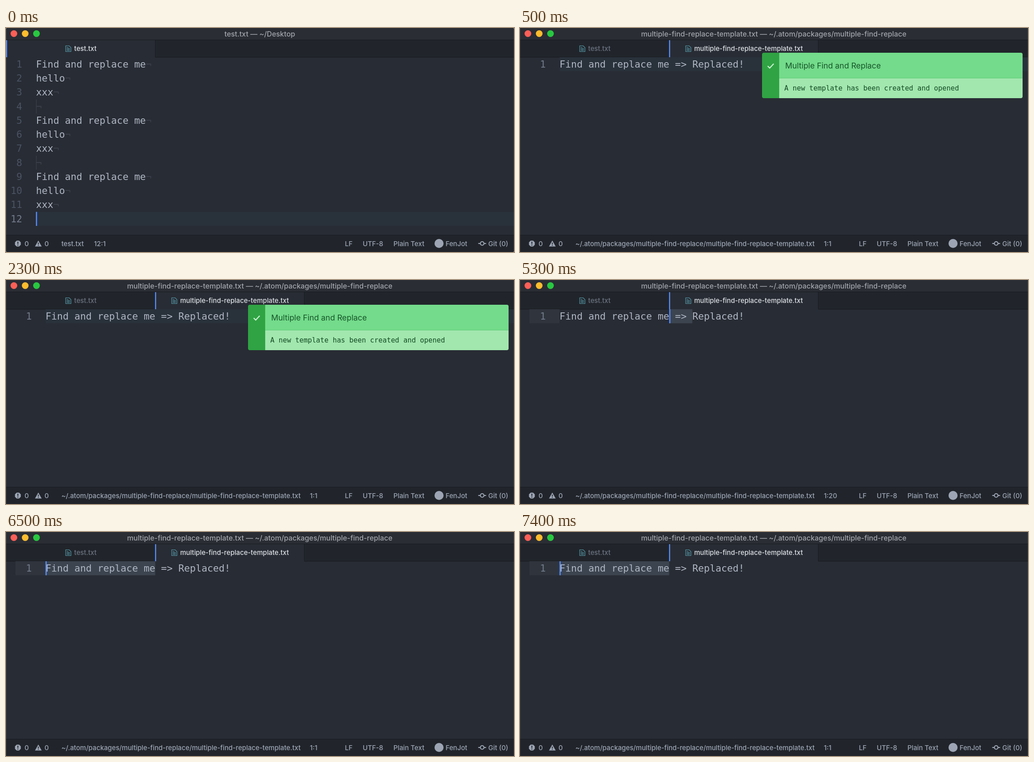
Recreate the animation shown at these times as an HTML page with a canvas. Size 1125 by 498 pixels, loop 8000 ms.

```html
<!DOCTYPE html>
<html lang="en">
<head>
<meta charset="utf-8">
<title>Editor</title>
<style>
html, body { margin: 0; width: 100%; height: 100%; overflow: hidden; background: #fff; }
canvas { display: block; width: 1125px; height: 498px; }
</style>
</head>
<body>
<canvas id="stage"></canvas>
<script>
const W = 1125, H = 498, LOOP = 8000;
const UI = 'Inter, "Open Sans", sans-serif';
const MONO = '"DejaVu Sans Mono", "Liberation Mono", monospace';
const C = {
  editor: '#282c34', bar: '#21252b', edge: '#181a1f', text: '#afb6c3',
  ui: '#9da5b4', dim: '#6b727f', bright: '#dde0e6', gutter: '#4b5364',
  gutterOn: '#737c8c', faint: '#3b414c', accent: '#568af2', cursor: '#528bff',
  row: '#29313b', gutterRow: '#30353d', select: '#3c4450'
};
const TOP = 65, ROW = 31.25, CHAR = 12.79, CODE = 21.25;
const FILE = 'multiple-find-replace-template.txt';
const DIR = '~/.atom/packages/multiple-find-replace';

const canvas = document.getElementById('stage');
const ctx = canvas.getContext('2d');
const dpr = window.devicePixelRatio || 1;
canvas.width = W * dpr;
canvas.height = H * dpr;
ctx.scale(dpr, dpr);
ctx.beginPath();
ctx.roundRect(0, 0, W, H, 3);
ctx.clip();

function rect(x, y, w, h, color) {
  ctx.fillStyle = color;
  ctx.fillRect(x, y, w, h);
}

function disc(x, y, r, color) {
  ctx.fillStyle = color;
  ctx.beginPath();
  ctx.arc(x, y, r, 0, Math.PI * 2);
  ctx.fill();
}

function path(points, close) {
  ctx.beginPath();
  points.forEach(([x, y]) => ctx.lineTo(x, y));
  if (close) ctx.closePath();
}

function stroke(points, color, width, close) {
  path(points, close);
  ctx.strokeStyle = color;
  ctx.lineWidth = width;
  ctx.stroke();
}

function fill(points, color) {
  path(points, true);
  ctx.fillStyle = color;
  ctx.fill();
}

function label(str, x, y, color, font, align = 'left') {
  ctx.font = font;
  ctx.textAlign = align;
  ctx.fillStyle = color;
  ctx.fillText(str, x, y);
}

const ui = (str, x, y, color, size = 14.75, weight = 500, align) =>
  label(str, x, y, color, `${weight} ${size}px ${UI}`, align);
const mono = (str, x, y, color, size = CODE, align) =>
  label(str, x, y, color, `${size}px ${MONO}`, align);

function titleBar(title) {
  rect(0, 0, W, 26, '#2a2d34');
  rect(0, 26, W, 1, C.edge);
  ['#fc5f57', '#fdbc2e', '#28c840'].forEach((c, i) => disc(17.5 + i * 25, 12.5, 7.4, c));
  ui(title, 562, 18.6, '#a2a5ab', 15.85, 500, 'center');
}

function fileIcon(x, y) {
  const color = '#559aaa';
  stroke([[x, y], [x + 7.5, y], [x + 11.5, y + 4], [x + 11.5, y + 13], [x, y + 13]], color, 1.2, true);
  for (const [dy, w] of [[3.5, 3.5], [6, 7], [8.3, 7], [10.5, 7]]) {
    rect(x + 2.2, y + dy - 0.5, w, 1.1, color);
  }
}

function tab(x, name, iconX, active) {
  if (active) {
    rect(x, 27, 330, 39, C.editor);
    rect(x, 27, 2.5, 38, C.accent);
  }
  rect(x + 330, 27, 1, 38, C.edge);
  fileIcon(iconX, 39.5);
  ui(name, iconX + 18.7, 51.4, active ? C.bright : C.dim);
}

function statusBar(file, pos, posX) {
  rect(0, 460, W, 38, C.bar);
  rect(0, 460, W, 1, C.edge);
  const y = 485;

  const octagon = Array.from({ length: 8 }, (_, i) => {
    const a = (i + 0.5) * Math.PI / 4;
    return [26.3 + 7 * Math.cos(a), 479.3 + 7 * Math.sin(a)];
  });
  fill(octagon, C.ui);
  rect(25.3, 475, 2, 5.2, C.bar);
  rect(25.3, 481.6, 2, 2, C.bar);
  ui('0', 41, y, C.ui);

  fill([[71.6, 472.4], [79, 485.8], [64.2, 485.8]], C.ui);
  rect(70.7, 477, 1.8, 4.2, C.bar);
  rect(70.7, 482.4, 1.8, 1.8, C.bar);
  ui('0', 85.3, y, C.ui);

  ui(file, 122.7, y, C.ui);
  ui(pos, posX, y, C.ui);
  ui('LF', 750.5, y, C.ui);
  ui('UTF-8', 790, y, C.ui);
  ui('Plain Text', 858, y, C.ui);
  disc(959, 479, 10, C.ui);
  ui('FenJot', 973.5, y, C.ui);

  ctx.beginPath();
  ctx.arc(1054.5, 479, 4, 0, Math.PI * 2);
  ctx.strokeStyle = C.ui;
  ctx.lineWidth = 2.2;
  ctx.stroke();
  rect(1045.8, 478, 4.5, 2.1, C.ui);
  rect(1058.7, 478, 4.5, 2.1, C.ui);
  ui('Git (0)', 1068, y, C.ui);
}

function frameBase(title) {
  rect(0, 0, W, H, C.editor);
  titleBar(title);
  rect(0, 27, W, 38, C.bar);
  rect(0, 64.5, W, 1, C.edge);
}

function windowEdge() {
  const glow = 'rgba(255, 255, 255, 0.08)';
  rect(0, 0, 1, H, glow);
  rect(W - 1, 0, 1, H, glow);
}

function testFile() {
  frameBase('test.txt — ~/Desktop');
  tab(0, 'test.txt', 132.3, true);
  const block = ['Find and replace me', 'hello', 'xxx', ''];
  const x = 66.5;
  for (let i = 0; i < 12; i++) {
    const top = TOP + i * ROW, base = top + 22.8, last = i === 11;
    if (last) rect(x, top, W - x, ROW, C.row);
    mono(String(i + 1), 35.8, base, last ? C.gutterOn : C.gutter, CODE, 'right');
    if (last) {
      rect(x - 0.3, top, 2.6, ROW, C.cursor);
      continue;
    }
    const line = block[i % 4];
    if (!line) rect(x, top, 1.2, ROW, C.faint);
    mono(line, x, base, C.text);
    mono('¬', x + line.length * CHAR, base, C.faint);
  }
  statusBar('test.txt', '12:1', 195);
}

function notice() {
  const x = 536, y = 55, w = 577, h = 101, side = 38;
  ctx.save();
  ctx.beginPath();
  ctx.roundRect(x, y, w, h, 4);
  ctx.clip();
  rect(x, y, side, h, '#30a344');
  rect(x + side, y, w - side, 57, '#73db8b');
  rect(x + side, y + 56, w - side, 1, '#62cc7b');
  rect(x + side, y + 57, w - side, h - 57, '#a2e7ae');
  ctx.restore();
  stroke([[548.5, 84.5], [553, 89], [561.8, 79.5]], '#c9f2d0', 2.4);
  ui('Multiple Find and Replace', 587.3, 90, '#175529', 17.4, 400);
  mono('A new template has been created and opened', 585.3, 139, '#124a23', 15.3);
}

// sel: [first, last) columns of the selection, cursor at its start
function templateFile(sel, pos) {
  const x = 87.5;
  frameBase(`${FILE} — ${DIR}`);
  tab(0, 'test.txt', 132.3, false);
  tab(330, FILE, 367, true);
  if (sel) {
    const start = x + sel[0] * CHAR;
    rect(21, TOP, x - 21, ROW, C.gutterRow);
    rect(start, TOP, (sel[1] - sel[0]) * CHAR, ROW, C.select);
  } else {
    rect(x, TOP, W - x, ROW, C.row);
  }
  mono('1', 57, TOP + 22.8, C.gutterOn, CODE, 'right');
  mono('Find and replace me => Replaced!', x, TOP + 22.8, C.text);
  if (sel) rect(x + sel[0] * CHAR, TOP, 2.6, ROW, C.cursor);
  statusBar(`${DIR}/${FILE}`, pos, 673);
}

function draw() {
  const t = performance.now() % LOOP;
  if (t < 500) {
    testFile();
  } else if (t < 3500) {
    templateFile(null, '1:1');
    notice();
  } else if (t < 6500) {
    templateFile([19, 23], '1:20');
  } else {
    templateFile([0, 19], '1:1');
  }
  windowEdge();
  requestAnimationFrame(draw);
}
draw();
</script>
</body>
</html>
```
